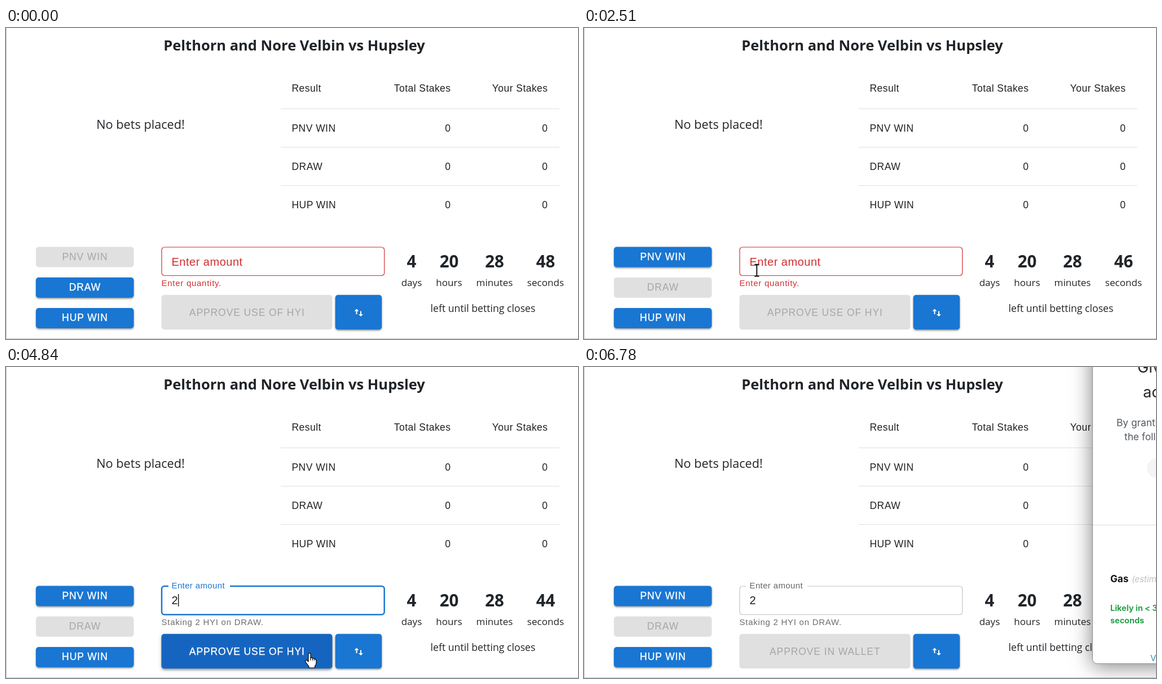
An HTML page for the animation above (8000 ms loop, 1014x552 px).

```html
<!DOCTYPE html>
<html lang="en">
<head>
<meta charset="utf-8">
<title>Place a bet</title>
<style>
  html, body { margin: 0; height: 100%; overflow: hidden; background: #fff; }
  svg { display: block; width: 1014px; height: 552px; }
  text { font: 17.5px "Liberation Sans", Arial, sans-serif; fill: #222; letter-spacing: .45px; }
  .end { text-anchor: end; }
  .page text { font-family: "Open Sans", "Noto Sans", sans-serif; font-size: 17.7px; fill: #212529; letter-spacing: 0; text-anchor: middle; }
  .page .title { font-size: 25.5px; font-weight: 700; }
  .page .empty { font-size: 21.7px; }
  .page .count { font-size: 29.5px; font-weight: 700; }
  .page .unit { font-size: 17.1px; }
  .btn text { letter-spacing: .9px; text-anchor: middle; stroke: #fff; }
  .wallet text { font: 17.3px Inter, sans-serif; fill: #535a61; letter-spacing: 0; }
  .wallet .head { font-size: 27px; fill: #24272a; }
  .wallet .bold { font-size: 14.4px; font-weight: 700; fill: #28a04a; }
  #helper { font-size: 15px; letter-spacing: .73px; }
  #label { letter-spacing: .025em; }
  #value { font-size: 20px; }
  .pointer path { fill: #fff; stroke: #000; stroke-width: 1.2; stroke-linejoin: round; }
</style>
</head>
<body>
<svg viewBox="0 0 1014 552">
  <path d="M.5 0V551.5H1014" fill="none" stroke="#c4c4c4"/>

  <g class="page">
    <text class="title" x="511" y="40">Pelthorn and Nore Velbin vs Hupsley</text>
    <text class="empty" x="238.5" y="179">No bets placed!</text>
    <text class="count" x="719" y="425">4</text><text class="unit" x="719" y="458">days</text>
    <text class="count" x="785.5" y="425">20</text><text class="unit" x="785.5" y="458">hours</text>
    <text class="count" x="866" y="425">28</text><text class="unit" x="866" y="458">minutes</text>
    <text class="count" x="956.5" y="425" id="seconds">48</text><text class="unit" x="956.5" y="458">seconds</text>
    <text x="845.5" y="504">left until betting closes</text>
  </g>

  <path d="M487 143.5H981M487 211.5H981M487 279.5H981" stroke="#e0e0e0"/>
  <text x="506.5" y="113">Result</text>
  <text class="end" x="788.5" y="113">Total Stakes</text>
  <text class="end" x="960.5" y="113">Your Stakes</text>
  <g id="rows"></g>

  <g class="btn" id="home"><rect x="53" y="388.5" width="173.5" height="36" rx="5"/><text x="140" y="411.7">PNV WIN</text></g>
  <g class="btn" id="draw"><rect x="53" y="442.7" width="173.5" height="36" rx="5"/><text x="140" y="466">DRAW</text></g>
  <g class="btn" id="away"><rect x="53" y="497" width="173.5" height="36" rx="5"/><text x="140" y="520">HUP WIN</text></g>
  <g class="btn" id="approve"><rect x="275.5" y="473.7" width="303" height="61.5" rx="5"/><text x="427.3" y="510.7"></text></g>
  <g class="btn" id="swap"><rect x="583.7" y="473.7" width="82.5" height="61.5" rx="5"/><text></text>
    <path transform="translate(617.5 498.5)" fill="#fff" d="M4 0L8 4H5V9.5H3V4H0zM11.5 13.5L7.5 9.5H10.5V4H12.5V9.5H15.5z"/></g>

  <rect id="field" x="276" y="389" width="394.7" height="50.5" rx="5" fill="none"/>
  <rect id="notch" y="385" height="7" fill="#fff"/>
  <text id="label" x="293.5">Enter amount</text>
  <text id="value" x="293.5" y="421">2</text>
  <rect id="caret" y="403" width="1.4" height="22" fill="#111"/>
  <text id="helper" x="275.5" y="457.5"></text>

  <g id="suggest" style="filter:drop-shadow(0 2px 3px rgba(0,0,0,.3))">
    <path d="M409 451H421L431 442 441 451H461a6 6 0 0 1 6 6V504a6 6 0 0 1-6 6H409a6 6 0 0 1-6-6V457a6 6 0 0 1 6-6z" fill="#fff"/>
    <text x="418" y="486.5" style="font:17px 'Open Sans',sans-serif;fill:#4a2f18">1</text>
  </g>

  <g class="wallet" id="wallet">
    <rect x="901.5" y="-60" width="300" height="586.5" rx="8" fill="#fff" stroke="#8c8c8c"
      style="filter:drop-shadow(0 4px 18px rgba(0,0,0,.5))"/>
    <g id="request">
      <text class="head" x="981" y="10">Give</text>
      <text class="head" x="991" y="54">access</text>
      <text x="944" y="105">By granting</text>
      <text x="958" y="130">the following</text>
      <rect x="998" y="162" width="80" height="35" rx="17.5" fill="#f2f4f6"/>
      <path d="M902 280.5H1014" stroke="#d6dfe6"/>
      <text class="bold" x="933" y="382" style="font-size:17px;fill:#111">Gas</text>
      <text x="971" y="382" style="font-size:15px;font-style:italic;fill:#bbc0c5">(estimated)</text>
      <text class="bold" x="933" y="433">Likely in &lt; 30</text>
      <text class="bold" x="933" y="454.5">seconds</text>
      <text x="1004" y="522" style="font-size:15px;fill:#2c8fae">View</text>
    </g>
  </g>

  <g class="pointer" id="pointer">
    <path id="arrow" d="M0 0V20L4.6 15.7 7.8 23 11.4 21.5 8.2 14.3H14.2z"/>
    <path id="hand" d="M-2 1.5C-2-.8 2-.8 2 1.5V8.5C3 7.5 5.4 7.8 5.6 9.3 7 8.4 8.8 9 9 10.5 10.5 10 12 11 12 12.5V17C12 20 10.5 22 9.5 23V26H-1V23.5L-7 15.5C-8.5 13-6 11.5-4 13L-2 15zM2 8.5V13M5.6 9.3V13M9 10.5V13"/>
    <path id="beam" d="M-4-10.5H-1L0-9.5 1-10.5H4M0-9.5V9.5M-4 10.5H-1L0 9.5 1 10.5H4" style="fill:none;stroke-width:1.8"/>
  </g>
</svg>
<script>
const $ = id => document.getElementById(id);
const LOOP = 8000;
const GREY = [224, 224, 224], BLUE = [25, 118, 210], DARK = [21, 101, 192];
const PICK = 1985, FOCUS = 2800, TYPED = 3700, SENT = 5497;
const ticks = [110, 1100, 2900, 3910, 4910, 5980];

// time, x, y, shape used until the next stop
const path = [
  [1100, 0, 323, 'arrow'], [1400, 62, 385, 'arrow'], [1690, 128, 443, 'hand'],
  [1830, 139, 449, 'hand'], [1940, 139, 449, 'arrow'], [2080, 139, 449, 'arrow'],
  [2450, 285, 432, 'beam'], [2650, 355, 426, 'beam'], [TYPED, 355, 426, ''],
  [3950, 355, 426, 'beam'], [4060, 357, 441, 'arrow'], [4150, 361, 463, 'arrow'],
  [4360, 410, 476, 'hand'], [4840, 538, 508, 'hand'], [4990, 541, 508, 'hand'],
  [SENT, 541, 508, 'arrow'], [5700, 541, 508, 'arrow'], [6080, 1020, 400, '']
];

$('rows').innerHTML = ['PNV WIN', 'DRAW', 'HUP WIN'].map((name, i) => {
  const y = 183.5 + 68 * i;
  return `<text x="506.5" y="${y}">${name}</text><text class="end" x="788.5" y="${y}">0</text><text class="end" x="960.5" y="${y}">0</text>`;
}).join('');

const ramp = (t, start, length = 250) => {
  const p = Math.min(1, Math.max(0, (t - start) / length));
  return p * p * (3 - 2 * p);
};
const lerp = (a, b, p) => a + (b - a) * p;
const mix = (a, b, p) => a.map((v, i) => lerp(v, b[i], p));
const show = (id, on) => $(id).style.display = on ? '' : 'none';
const set = (id, attrs) => { for (const k in attrs) $(id).setAttribute(k, attrs[k]); };

// on: 0 disabled to 1 enabled
function paint(id, on = 1, hover = 0) {
  const [rect, text] = $(id).children;
  const lift = on * (1 + hover * .8);
  const alpha = lerp(.26, 1, on), light = 255 * on / alpha;
  rect.style.fill = `rgb(${mix(GREY, mix(BLUE, DARK, hover), on)})`;
  rect.style.filter = lift
    ? `drop-shadow(0 ${2 * lift}px ${lift}px rgba(0,0,0,.27)) drop-shadow(0 ${lift}px ${2.2 * lift}px rgba(0,0,0,.16))`
    : 'none';
  text.style.fill = `rgba(${light},${light},${light},${alpha})`;
  text.style.strokeWidth = .35 * on;
}

function drawField(t) {
  const typed = t >= TYPED, resting = t >= SENT;
  const focused = t >= FOCUS && !resting;
  const float = ramp(t, FOCUS, 200);
  const accent = typed ? '#1976d2' : '#d32f2f';
  set('field', { stroke: resting ? '#c4c4c4' : accent, 'stroke-width': focused ? 2.5 : 1.2 });
  set('notch', { x: resting ? 287 : 288, width: 109 * float });
  set('label', { y: lerp(422, 392.5, float) });
  $('label').style.fontSize = lerp(20, 15, float) + 'px';
  $('label').style.fill = resting ? '#666' : accent;
  $('helper').textContent = typed ? 'Staking 2 HYI on DRAW.' : 'Enter quantity.';
  $('helper').style.fill = typed ? '#6c6c6c' : '#d32f2f';
  set('caret', { x: typed ? 305 : 293.5 });
  show('value', typed);
  show('caret', (t >= FOCUS && t < 3330) || (typed && t < 4180) || (t >= 4690 && t < 5220));
  show('suggest', t >= 2950 && !typed);
}

function drawPointer(t) {
  const i = path.findLastIndex(stop => t >= stop[0]);
  const [t0, x0, y0, shape] = path[i] || [0, 0, 0, ''];
  const [t1, x1, y1] = path[i + 1] || [t0 + 1, x0, y0];
  const p = (t - t0) / (t1 - t0);
  set('pointer', { transform: `translate(${lerp(x0, x1, p)} ${lerp(y0, y1, p)})` });
  for (const id of ['arrow', 'hand', 'beam']) show(id, id === shape);
}

const start = performance.now();

function draw() {
  const t = (performance.now() - start) % LOOP;
  const picked = ramp(t, PICK);
  $('seconds').textContent = 48 - ticks.filter(tick => t >= tick).length;
  paint('home', picked);
  paint('draw', 1 - picked, ramp(t, 1690));
  paint('away');
  paint('swap');
  paint('approve', ramp(t, TYPED) - ramp(t, SENT), ramp(t, 4380));
  $('approve').lastChild.textContent = t < SENT ? 'APPROVE USE OF HYI' : 'APPROVE IN WALLET';
  drawField(t);
  drawPointer(t);
  $('wallet').style.opacity = ramp(t, 5900, 180);
  show('request', t >= 6780);
  requestAnimationFrame(draw);
}
draw();
</script>
</body>
</html>
```
